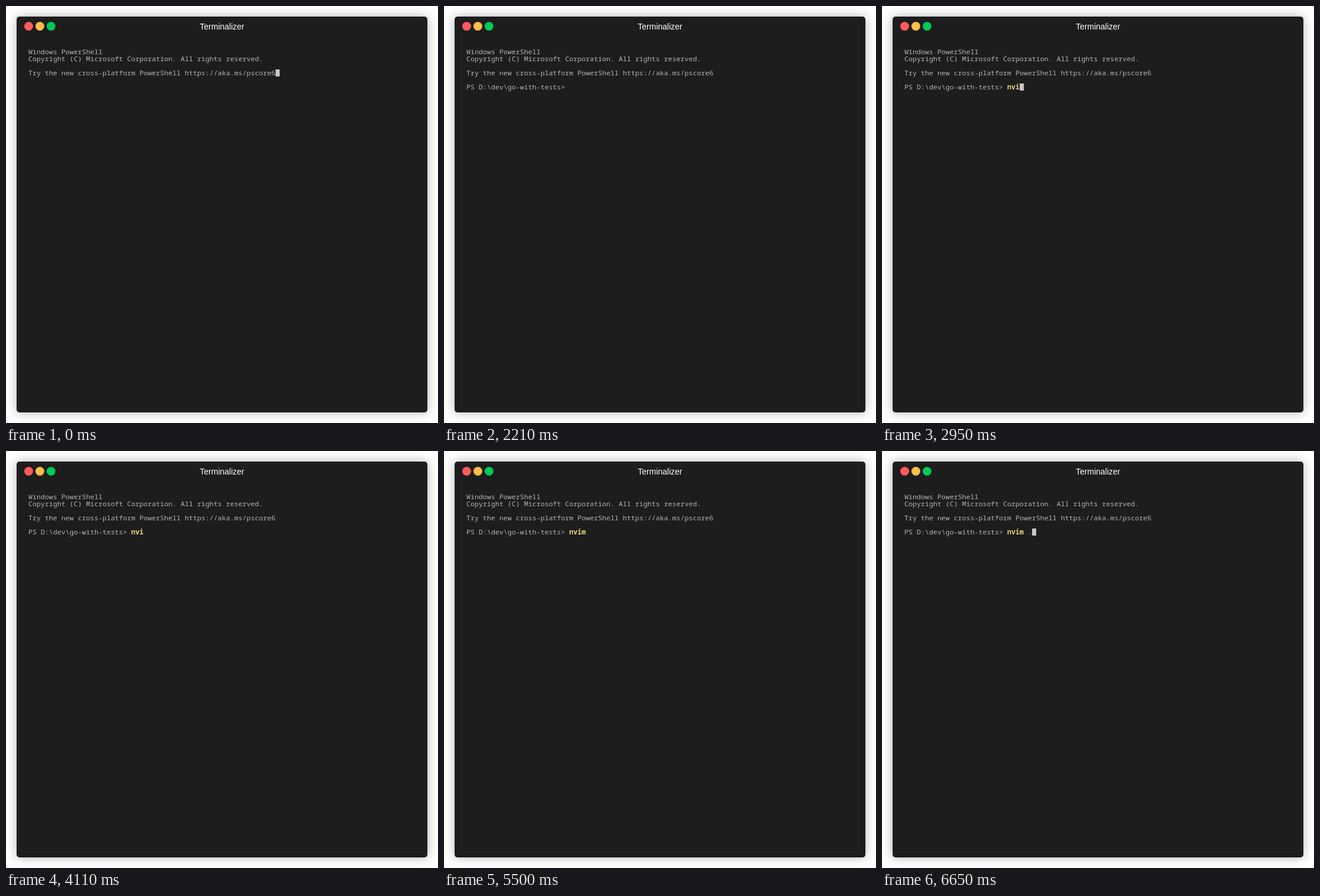
An HTML page that plays this animation: 734x710 px, repeating every 8000 ms.

```html
<!DOCTYPE html>
<html lang="en">
<head>
<meta charset="utf-8">
<title>Terminal</title>
<style>
  :root { --cell: 7px; --row: 12px; --loop: 8s step-end infinite; }
  html, body { margin: 0; width: 734px; height: 710px; overflow: hidden; background: #fff; }
  .window {
    position: absolute; left: 18px; top: 18px; width: 698px; height: 674px;
    border-radius: 5px; background: #1d1d1d;
    box-shadow: 0 0 18px rgba(0, 0, 0, .3);
  }
  .dot { position: absolute; top: 9px; width: 15px; height: 15px; border-radius: 50%; }
  .red { left: 13px; background: #ff5a5c; }
  .amber { left: 32px; background: #ffbe4a; }
  .green { left: 51px; background: #00c957; }
  .title {
    position: absolute; top: 9px; width: 100%; text-align: center;
    font: 14px/16px "Liberation Sans", Arial, sans-serif; color: #fff;
  }
  .screen {
    position: absolute; left: 20px; top: 54px;
    font: 11.667px/var(--row) "Noto Sans Mono", monospace; color: #b4b4b4;
  }
  .line { height: var(--row); white-space: pre; }
  .prompt { height: 16px; overflow: hidden; animation: type var(--loop); }
  .prompt b { color: #e8d47c; }
  .cursor {
    position: absolute; width: var(--cell); height: var(--row); background: #c7c7c7;
    left: calc(var(--col) * var(--cell)); top: calc(var(--line) * var(--row));
    animation: move var(--loop), hide var(--loop);
  }

  /* the prompt appears, then one key at a time */
  @keyframes type {
    0% { width: 0; }
    3% { width: 175px; }
    28.875% { width: 182px; }
    34.375% { width: 189px; }
    36.875% { width: 196px; }
    52.625% { width: 203px; }
    70% { width: 210px; }
    83.125%, 100% { width: 217px; }
  }
  @keyframes move {
    0% { --col: 60; --line: 3; }
    3% { --col: 25; --line: 5; }
    28.875% { --col: 26; --line: 5; }
    34.375% { --col: 27; --line: 5; }
    36.875% { --col: 28; --line: 5; }
    52.625% { --col: 29; --line: 5; }
    70% { --col: 30; --line: 5; }
    83.125%, 100% { --col: 31; --line: 5; }
  }
  /* the cursor is off just before each redraw */
  @keyframes hide {
    0%, 3%, 28.875%, 34.375%, 36.875%, 52.625%, 70%, 83.125%, 100% { opacity: 1; }
    1.25%, 27.625%, 33.125%, 35.625%, 51.375%, 68.75%, 81.875% { opacity: 0; }
  }
</style>
</head>
<body>
<div class="window">
  <i class="dot red"></i><i class="dot amber"></i><i class="dot green"></i>
  <div class="title">Terminalizer</div>
  <div class="screen">
    <div class="cursor"></div>
    <div class="line">Windows PowerShell</div>
    <div class="line">Copyright (C) Microsoft Corporation. All rights reserved.</div>
    <div class="line"></div>
    <div class="line">Try the new cross-platform PowerShell https://aka.ms/pscore6</div>
    <div class="line"></div>
    <div class="line prompt">PS D:\dev\go-with-tests&gt; <b>nvim</b> .</div>
  </div>
</div>
</body>
</html>
```
